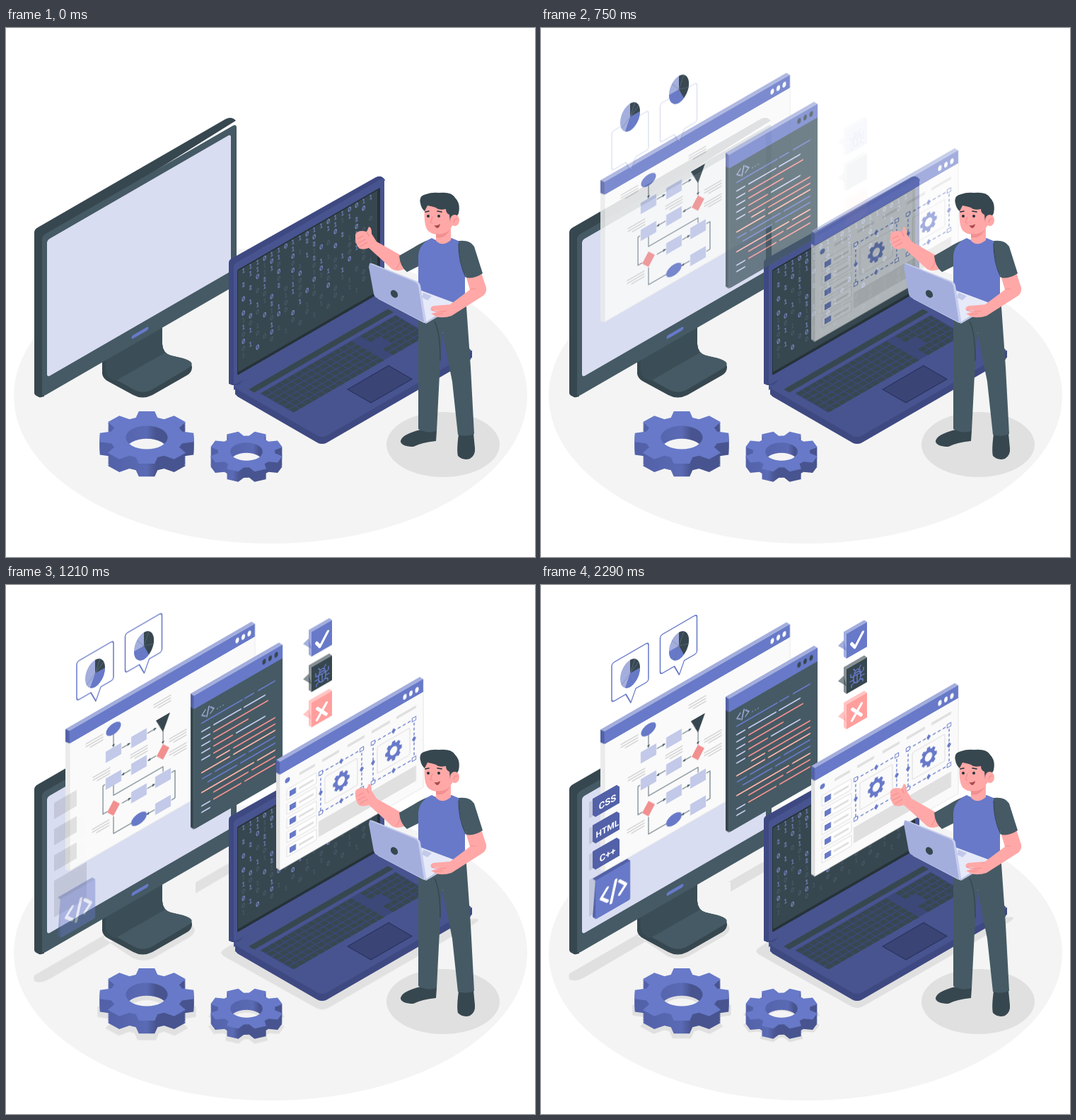
Recreate the animation shown at these times as an HTML page without scripts. Size 748x748 px, loop 2330 ms.

```html
<!DOCTYPE html>
<html lang="en">
<head>
<meta charset="utf-8">
<title>Software development scene</title>
<style>
html, body { margin: 0; height: 100%; overflow: hidden; background: #fff; }
svg { display: block; width: 100%; height: 100%; }

.blue { fill: #6779c8; }
.mid { fill: #5261a8; }
.navy { fill: #48548f; }
.deep { fill: #3e4982; }
.pale { fill: #a3aedd; }
.slate { fill: #455a64; }
.dark { fill: #37474f; }
.ink { fill: #263238; }
.skin { fill: #ffa8a7; }
.paper { fill: #fafafa; }
.white { fill: #fff; }
.shade { fill: #e0e0e0; stroke: #e0e0e0; }
.line { fill: none; stroke-linecap: round; stroke-linejoin: round; }
.bits { font: 9px "Noto Sans Mono", monospace; letter-spacing: 4.6px; white-space: pre; }
.label { font: bold 13px Roboto, sans-serif; fill: #fff; text-anchor: middle; }

/* Each part rises by --d while fading in, overshoots, then holds. */
.pie, .main, .code, .design, .bubble, .icon, .glyph, .ground, .tagshade, .app, .tag {
  animation: 2330ms cubic-bezier(.36, -.01, .5, 1.38) infinite both;
  --d: 45px;
}
.pie { animation-name: pie; --d: 58px; }
.main, .code, .design { animation-timing-function: cubic-bezier(.36, -.01, .5, 1.53); --d: 80px; }
.main { animation-name: main; }
.code { animation-name: code; }
.design { animation-name: design; }
.bubble { animation-name: bubble; }
.icon { animation-name: icon; --d: 80px; }
.glyph { animation-name: icon; --d: 30px; }
.ground { animation-name: ground; }
.tagshade { animation-name: tagshade; }
.app { animation-name: app; }
.tag { animation-name: tag; }

@keyframes pie { 0%, 6.4% { opacity: 0; transform: translateY(var(--d)); } 45.1%, 100% { opacity: 1; transform: none; } }
@keyframes main { 0%, 9.4% { opacity: 0; transform: translateY(var(--d)); } 52.4%, 100% { opacity: 1; transform: none; } }
@keyframes code { 0%, 11.6% { opacity: 0; transform: translateY(var(--d)); } 54.5%, 100% { opacity: 1; transform: none; } }
@keyframes design { 0%, 12.9% { opacity: 0; transform: translateY(var(--d)); } 60.1%, 100% { opacity: 1; transform: none; } }
@keyframes bubble { 0%, 23.2% { opacity: 0; transform: translateY(var(--d)); } 60.9%, 100% { opacity: 1; transform: none; } }
@keyframes icon { 0%, 28.3% { opacity: 0; transform: translateY(var(--d)); } 60.9%, 100% { opacity: 1; transform: none; } }
@keyframes ground { 0%, 35.2% { opacity: 0; transform: translateY(var(--d)); } 61.8%, 100% { opacity: 1; transform: none; } }
@keyframes tagshade { 0%, 36.5% { opacity: 0; transform: translateY(var(--d)); } 60.1%, 100% { opacity: 1; transform: none; } }
@keyframes app { 0%, 36.5% { opacity: 0; transform: translateY(var(--d)); } 81.5%, 100% { opacity: 1; transform: none; } }
@keyframes tag { 0%, 49.4% { opacity: 0; transform: translateY(var(--d)); } 94.4%, 100% { opacity: 1; transform: none; } }
</style>
</head>
<body>
<svg viewBox="0 0 748 748">
<defs>
  <linearGradient id="side"><stop offset=".1" stop-color="#5261a8"/><stop offset=".5" stop-color="#5a6ab4"/><stop offset=".6" stop-color="#48548f"/></linearGradient>
  <path id="cog" fill-rule="evenodd" stroke-linejoin="round" d="M65-11 65 11 49 15 45 24 54 38 38 54 24 45 15 49 11 65-11 65-15 49-24 45-38 54-54 38-45 24-49 15-65 11-65-11-49-15-45-24-54-38-38-54-24-45-15-49-11-65 11-65 15-49 24-45 38-54 54-38 45-24 49-15zM29 0A29 29 0 1 0-29 0 29 29 0 1 0 29 0z"/>
  <use id="turned" href="#cog" transform="rotate(22.5)"/>
  <g id="block"><path d="M0 0-4-5H25L29 0zM0 0-4-5V30L0 35z" opacity=".6"/><path d="M-4 7-12 10 0 24z" opacity=".6"/><path d="M0 0H29V35H0z"/></g>
  <path id="balloon" class="white" stroke="#6779c8" stroke-width="1.5" stroke-linejoin="round" d="M4 0H48q4 0 4 4V51q0 4-4 4H34L27 71 20 55H4q-4 0-4-4V4q0-4 4-4z"/>
  <rect id="step" x="-11" y="-8" width="22" height="16" fill="#c2c9e9"/>
  <path id="choice" d="M-9 1 0-11 9-1 0 11z" fill="#f28f8f"/>
  <path id="note" class="line" d="M0 0H24M0 4H24M6 8H24" stroke="#aaa" stroke-width=".8"/>
  <g id="dots"><ellipse rx="2.5" ry="3.8"/><ellipse cx="8.5" rx="2.5" ry="3.8"/><ellipse cx="17" rx="2.5" ry="3.8"/></g>
  <g id="frame">
    <rect width="58" height="56" fill="none" stroke="#6779c8" stroke-width="1.3" stroke-dasharray="4 3"/>
    <path d="M-2.5-2.5h5v5h-5zM55.5-2.5h5v5h-5zM-2.5 53.5h5v5h-5zM55.5 53.5h5v5h-5z" fill="#fff" stroke="#6779c8"/>
    <path class="blue" d="M29-4 32 0 29 4 26 0zM29 52 32 56 29 60 26 56zM0 24 3 28 0 32-3 28zM58 24 61 28 58 32 55 28z"/>
    <rect x="6" y="9" width="46" height="38" rx="2" fill="none" stroke="#ddd"/>
    <use href="#cog" class="blue" transform="translate(29 28) scale(.18 .21)"/>
  </g>
  <g id="item"><rect width="42" height="15" rx="1" fill="#fff" stroke="#e0e0e0"/><rect x="4" y="4" width="9" height="8" class="blue"/><path d="M17 8H38" stroke="#ddd" stroke-width="3"/></g>
  <path id="plate" d="M0 0-4-5H30L34 0V23H0L-4 18V-5z"/>
  <rect id="deck" width="214" height="125" rx="6" transform="matrix(1 -.577 1 .577 322 508)"/>
</defs>

<ellipse cx="374" cy="520" rx="363" ry="209" fill="#f4f4f4"/>

<g class="ground">
  <path class="shade" stroke="none" d="M40 550 316 391 340 391 62 554Q48 562 40 557zM136 496 180 525Q194 531 208 525L260 495Q270 488 264 480L221 470zM305 519Q304 515 310 512L330 500 662 470Q672 469 664 475L456 595Q447 600 438 595L308 522z"/>
  <use href="#cog" class="shade" transform="translate(199 601) scale(1.04 .6)" stroke-width="4"/>
  <use href="#turned" class="shade" transform="translate(340 615) scale(.81 .47)" stroke-width="4"/>
</g>

<!-- monitor -->
<path class="dark" d="M136 471V489Q137 496 145 500L180 519Q193 526 207 519L256 491Q263 487 263 480V476L221 440 150 440z"/>
<path fill="#f4f4f4" d="M221 420V447Q222 460 233 463L250 467Q263 471 263 479H268V420z"/>
<path class="slate" d="M155 455V493L221 456V447Q222 460 233 463L250 467Q272 473 256 482L207 511Q194 518 182 512L155 497z"/>
<path d="M141 466 221 422V450Q222 456 225 459L155 499Q141 494 141 484z" fill="#3b4e57"/>
<path class="dark" d="M40 516V289Q40 285 45 282L310 129Q319 124 325 131L54 300V521L50 522Q47 523 45 521 40 519 40 516z"/>
<g transform="translate(51 294) skewY(-30)">
  <rect width="275" height="228" rx="5" class="slate"/>
  <rect x="7" y="10" width="260" height="194" rx="4" fill="#d9ddf1"/>
  <path class="line" d="M129 217H148" stroke="#6779c8" stroke-width="5"/>
</g>

<!-- laptop -->
<path class="navy" d="M322 500 536 376V390L322 512z"/>
<g class="deep">
  <use href="#deck" y="10"/><use href="#deck" y="5"/>
  <path d="M324 508V518L447 588 659 466V456z"/>
  <path d="M315 503V332Q315 328 319 326L523 211Q531 207 536 215L330 505H320z"/>
</g>
<use href="#deck" class="navy"/>
<g transform="matrix(1 -.577 1 .577 322 508)">
  <path d="M8 17H205" stroke="#37474f" stroke-width="8"/>
  <rect x="11" y="26" width="192" height="47" fill="#3c4878"/>
  <path d="M12 30H140M12 38H140M12 46H140M12 54H140M12 62H140M12 70H140M152 30H202M152 38H202M166 46H202M166 54H202M152 62H202M152 70H202" stroke="#37474f" stroke-width="6.4" stroke-dasharray="8 1.2"/>
  <rect x="78" y="83" width="58" height="33" fill="#3a4475" stroke="#27305c"/>
</g>
<g transform="translate(322 334) skewY(-30)">
  <rect width="213" height="171" rx="4" class="navy"/>
  <rect x="5" y="11" width="202" height="149" rx="2" class="ink"/>
  <rect x="6" y="13" width="197" height="143" class="dark"/>
  <text class="bits" fill="#62728c" opacity=".5" y="18">
    <tspan x="11" dy="12">   1     0    1  0  </tspan><tspan x="11" dy="10">0  1 0  1 0  1  0 </tspan><tspan x="11" dy="10"> 0 0 1 0  1 0 0 1 0</tspan><tspan x="11" dy="10">1 0  0  1 0  0 1 0 </tspan><tspan x="11" dy="10"> 1 0 0 1  0 1  0 1 </tspan><tspan x="11" dy="10">0  1  0 0 1  0 0 1 </tspan><tspan x="11" dy="10">1 0 0 1 0  1 0 1 0 </tspan><tspan x="11" dy="10"> 0  1 0 0 1 0 1  0 </tspan><tspan x="11" dy="10">0 1 0 0 1 0 0 1 0 1</tspan><tspan x="11" dy="10">1 0 1  0 1 0 0 1 0 </tspan><tspan x="11" dy="10">0  0 1 0 0 1 0 1 0 </tspan><tspan x="11" dy="10">1 0 0 1 0 1 0 0 1  </tspan>
  </text>
  <text class="bits" fill="#8493dc" y="8">
    <tspan x="11" dy="12">1110110110110110011</tspan><tspan x="11" dy="10"> 11 01 1 10 11 1 0 </tspan><tspan x="11" dy="10">1 0 1  0  1  0  1  </tspan><tspan x="11" dy="10"> 1 1 0   1 0  1 0  </tspan><tspan x="11" dy="10">0  1   0  1  0  1  </tspan><tspan x="11" dy="10"> 1   1  0  1    0  </tspan><tspan x="11" dy="10">0 1 0  1   0  1 1  </tspan><tspan x="11" dy="10"> 0  1  1  0 1  0   </tspan><tspan x="11" dy="10">1  0 1   0    1    </tspan><tspan x="11" dy="10"> 1   0  1   0      </tspan><tspan x="11" dy="10">0   1  0           </tspan><tspan x="11" dy="10"> 1  0              </tspan><tspan x="11" dy="10">  0                </tspan>
  </text>
</g>

<!-- gears -->
<g transform="translate(199 579) scale(1.02 .57)">
  <g fill="url(#side)"><use href="#cog" y="32"/><use href="#cog" y="28"/><use href="#cog" y="24"/><use href="#cog" y="20"/><use href="#cog" y="16"/><use href="#cog" y="12"/><use href="#cog" y="8"/><use href="#cog" y="4"/></g>
  <use href="#cog" class="blue"/>
</g>
<g transform="translate(340 599) scale(.79 .44)">
  <g fill="url(#side)"><use href="#turned" y="33"/><use href="#turned" y="28"/><use href="#turned" y="24"/><use href="#turned" y="20"/><use href="#turned" y="16"/><use href="#turned" y="12"/><use href="#turned" y="8"/><use href="#turned" y="4"/></g>
  <use href="#turned" class="blue"/>
</g>

<!-- flowchart window -->
<g class="main"><g transform="translate(90 207) skewY(-30)">
  <path class="pale" d="M0 0-6-6H257L262 0z"/>
  <path fill="#ebebeb" d="M0 17-6 11V193L0 198z"/>
  <path class="mid" d="M0 0-6-6V12L0 18z"/>
  <rect y="17" width="262" height="181" class="paper" stroke="#e6e6e6" stroke-width=".8"/>
  <rect width="262" height="18" class="blue"/>
  <use href="#dots" x="237" y="9" class="white"/>
  <path class="line" stroke="#455a64" stroke-width=".9" d="M62 41V58M74 67H85M110 67H122M132 74V93M122 106H111M86 105H74M50 105H47V145H53M62 113V127H132V134M74 145H86M110 145H120M144 142H149V181H144M120 181H109M88 181H62V157"/>
  <path class="slate" d="M60 55h4l-2 4zM82 65v4l4-2zM119 65v4l4-2zM130 91h4l-2 4zM114 104v4l-4-2zM77 103v4l-4-2zM83 143v4l4-2zM117 143v4l4-2zM112 179v4l-4-2z"/>
  <g class="blue"><ellipse cx="62" cy="33" rx="10.5" ry="8"/><ellipse cx="98" cy="181" rx="11" ry="8"/></g>
  <use href="#step" x="62" y="67"/><use href="#step" x="98" y="67"/><use href="#step" x="62" y="105"/><use href="#step" x="98" y="105"/><use href="#step" x="98" y="145"/><use href="#step" x="132" y="143"/><use href="#step" x="132" y="181"/>
  <path class="dark" d="M122 56H142L132 78z"/>
  <use href="#choice" x="132" y="106"/><use href="#choice" x="62" y="145"/>
  <use href="#note" x="23" y="32"/><use href="#note" x="33" y="85"/><use href="#note" x="119" y="32"/><use href="#note" x="86" y="84"/><use href="#note" x="141" y="93"/><use href="#note" x="141" y="112"/><use href="#note" x="32" y="158"/>
</g></g>

<!-- code window -->
<g class="code"><g transform="translate(266 161) skewY(-30)">
  <path class="pale" d="M0 0-5-6H120L125 0z"/>
  <path class="dark" d="M0 18-5 12V183L0 189z"/>
  <path class="mid" d="M0 0-5-6V13L0 19z"/>
  <rect width="125" height="189" rx="2" class="slate"/>
  <rect width="125" height="19" class="blue"/>
  <use href="#dots" x="99" y="9" class="dark"/>
  <g class="line" stroke-width="2.2">
    <path stroke="#a3aedd" stroke-width="1.6" d="M16 29 11 34 16 38M21 27 18 40M23 29 28 34 23 38M33 37h0M37 37h0M41 37h0"/>
    <path stroke="#6779c8" d="M11 45H68M72 45H84M91 45H114M12 124H24M30 124H72M78 124H114M20 133H60M66 133H114"/>
    <path stroke="#c2c9e9" d="M11 57H22M28 57H66M71 57H100M11 67H22M11 77H22M11 87H22M11 97H22M60 87H100M11 162H22M11 171H22"/>
    <path stroke="#f28f8f" d="M28 67H104M28 77H76M28 87H54M28 97H114M56 106H114M28 152H76M82 152H114M28 162H66M72 162H114"/>
    <path stroke="#ffb3a8" d="M11 115H50M56 115H114M32 106H50M11 143H84M90 143H114"/>
  </g>
</g></g>

<!-- design window -->
<g class="design"><g transform="translate(387 259) skewY(-30)">
  <path class="pale" d="M0 0-5-6H198L203 0z"/>
  <path fill="#e0e0e0" d="M0 17-5 11V147L0 153z"/>
  <path class="mid" d="M0 0-5-6V12L0 18z"/>
  <rect y="17" width="203" height="136" class="paper" stroke="#e0e0e0" stroke-width=".8"/>
  <rect width="203" height="18" class="blue"/>
  <use href="#dots" x="177" y="10" class="white"/>
  <circle cx="11" cy="32" r="3.5" class="blue"/>
  <path d="M28 33H50M60 33H84M96 33H120M130 33H156M165 33H193" stroke="#e0e0e0" stroke-width="4"/>
  <use href="#item" x="10" y="45"/><use href="#item" x="10" y="65"/><use href="#item" x="10" y="85"/><use href="#item" x="10" y="105"/><use href="#item" x="10" y="125"/>
  <use href="#frame" x="58" y="49"/><use href="#frame" x="132" y="49"/>
  <rect x="55" y="116" width="138" height="22" fill="#e0e0e0"/>
</g></g>

<!-- chart bubbles -->
<g class="bubble">
  <use href="#balloon" transform="translate(100 111) skewY(-30)"/>
  <use href="#balloon" transform="translate(168.5 71.5) skewY(-30)"/>
</g>
<g class="pie">
  <g transform="translate(126 125) skewY(-30) scale(14 19)">
    <circle r="1" class="pale"/><path class="blue" d="M0 0 1 0A1 1 0 0 1-.5.87z"/><path class="dark" d="M0 0V-1A1 1 0 0 1 1 0z"/>
    <path d="M0 0 .5-.87M0 0 .87-.5M0 0-.87.5M0 0 .5.87" stroke="#7782b5" stroke-width=".03"/>
  </g>
  <g transform="translate(195 86) skewY(-30) scale(14 19)">
    <circle r="1" class="pale"/><path class="blue" d="M0 0 .5.87A1 1 0 0 1-1 0z"/><path class="dark" d="M0 0V-1A1 1 0 0 1 .5.87z"/>
    <path d="M0 0 .5-.87M0 0 .97.26M0 0-.7-.7M0 0-.5.87" stroke="#6b7895" stroke-width=".03"/>
  </g>
</g>

<!-- status icons -->
<g class="icon">
  <use href="#block" class="blue" transform="translate(432 69) skewY(-30)"/>
  <use href="#block" class="dark" transform="translate(432 119) skewY(-30)"/>
  <use href="#block" fill="#ff9f9d" transform="translate(432 169) skewY(-30)"/>
</g>
<g class="glyph line" stroke="#fff" stroke-width="4">
  <path transform="translate(432 69) skewY(-30)" d="M7 18 12 26 23 11"/>
  <path transform="translate(432 169) skewY(-30)" d="M8 11 21 27M21 11 8 27"/>
  <path transform="translate(432 119) skewY(-30)" stroke="#6779c8" stroke-width="1.5" d="M10 15Q15 10 20 15V23Q15 32 10 23zM10 16H20M15 16V27M11 12Q15 6 19 12M12 9 10 6M18 9 20 6M10 17 6 15V11M20 17 24 15V11M10 21H5M20 21H25M11 25 7 27V30M19 25 23 27V30"/>
</g>

<!-- language tags -->
<g class="tagshade" fill-opacity=".1">
  <rect width="32" height="23" transform="translate(68 307) skewY(-30)"/>
  <rect width="32" height="23" transform="translate(68 344) skewY(-30)"/>
  <rect width="32" height="23" transform="translate(68 381) skewY(-30)"/>
  <rect width="46" height="52" transform="translate(68 417) skewY(-30)"/>
</g>
<g class="tag">
  <g transform="translate(77 305) skewY(-30)"><use href="#plate" class="mid"/><text class="label" x="17" y="16">CSS</text></g>
  <g transform="translate(77 342.5) skewY(-30)"><use href="#plate" class="mid"/><text class="label" x="17" y="16" style="font-size:12px">HTML</text></g>
  <g transform="translate(77 379.5) skewY(-30)"><use href="#plate" class="mid"/><text class="label" x="17" y="16">C++</text></g>
</g>
<g class="app"><g transform="translate(77 418) skewY(-30)">
  <path class="mid" d="M0 0-4-5H45L49 0V54H0L-4 49z"/>
  <rect width="49" height="55" rx="2" class="blue"/>
  <path class="line" d="M17 20 8 30 17 39M29 16 22 44M34 20 43 30 34 39" stroke="#fff" stroke-width="4"/>
</g></g>

<!-- man -->
<ellipse cx="618" cy="589" rx="80" ry="46" fill="#e0e0e0"/>
<path class="dark" d="M586 568Q558 575 558 585 560 592 576 592 588 586 608 584L609 570zM640 574Q637 597 639 605 646 612 656 609 664 604 663 594L661 573z"/>
<path class="slate" d="M583 405V567q12 7 26 3L614 470 617 430 631 500 639 575q12 4 23-1L657 480 650 380H583z"/>
<path class="line" d="M606 415Q614 430 614 470" stroke="#37474f" stroke-width="1.5"/>
<path class="skin" d="M561 323 524 302 517 291Q517 281 513 281L510 288Q497 285 494 292 493 306 500 312 506 314 513 311L546 341Q555 346 565 340z"/>
<path class="line" d="M497 298 505 294M498 304 508 299M501 309 511 303M510 288 513 294M552 340Q557 334 558 327" stroke="#f28f8f" stroke-width="1.2"/>
<path class="slate" d="M599 299Q586 304 577 310L556 322Q557 337 567 345L585 336z"/>
<path class="blue" d="M602 297Q615 305 630 297L642 302Q650 330 649 350V390H583V322Q584 305 602 297z"/>
<path class="skin" d="M608 282V301Q617 310 629 300V280z"/>
<path class="skin" d="M592 252Q590 280 597 287 605 294 616 291 627 287 631 280L630 247Q610 244 594 248z"/>
<path fill="#f28f8f" d="M608 291Q620 293 628 285 620 299 608 296z"/>
<path class="dark" d="M586 248Q583 237 594 235 602 232 612 233 630 231 635 240 643 248 640 262L635 271 628 274 627 264Q622 262 622 256 612 258 608 254 602 252 596 251L592 259Q587 255 586 248z"/>
<ellipse cx="634.500" cy="272" rx="6.500" ry="8" class="skin"/>
<g class="ink"><circle cx="597" cy="266" r="2"/><circle cx="612" cy="266" r="2"/><path d="M605 279Q610 280 614 277 613 283 609 283z" fill="#a84c50"/></g>
<path class="line" d="M593 260 598 259M610 259 616 260" stroke="#263238" stroke-width="1.6"/>
<path class="line" d="M603 267 600 275 603 276M633 275Q634 269 638 270" stroke="#f28f8f" stroke-width="1.2"/>
<path fill="#e6e9f8" d="M578 360 584 370 635 389 616 402 594 416 585 410z"/>
<path fill="#c2c9e9" d="M590 374 602 379 596 385 588 381zM592 417 616 402V405L594 418z"/>
<path fill="#c6cdee" d="M514 333Q515 332 518 333L581 358Q585 360 586 364L594 413Q594 419 589 416L526 383z"/>
<path class="pale" d="M514 333 578 359Q582 361 583 365L591 416 525 382Q521 380 520 376L513 338z"/>
<ellipse cx="549" cy="376" rx="4.5" ry="6" transform="rotate(-38 549 376)" class="dark"/>
<path class="skin" d="M650 350Q662 354 672 346L679 367Q680 375 674 379L630 407Q618 411 608 408L601 404 614 400 601 399Q599 395 604 393L628 391 656 370z"/>
<path class="line" d="M602 399Q612 403 622 400M606 405 618 404M657 369 664 369" stroke="#f28f8f" stroke-width="1.2"/>
<path class="slate" d="M640 301Q656 299 662 309L674 347Q662 355 651 353 640 330 640 301z"/>
<path class="line" d="M640 305Q640 332 650 352" stroke="#37474f" stroke-width="1.2"/>
</svg>
</body>
</html>
```
